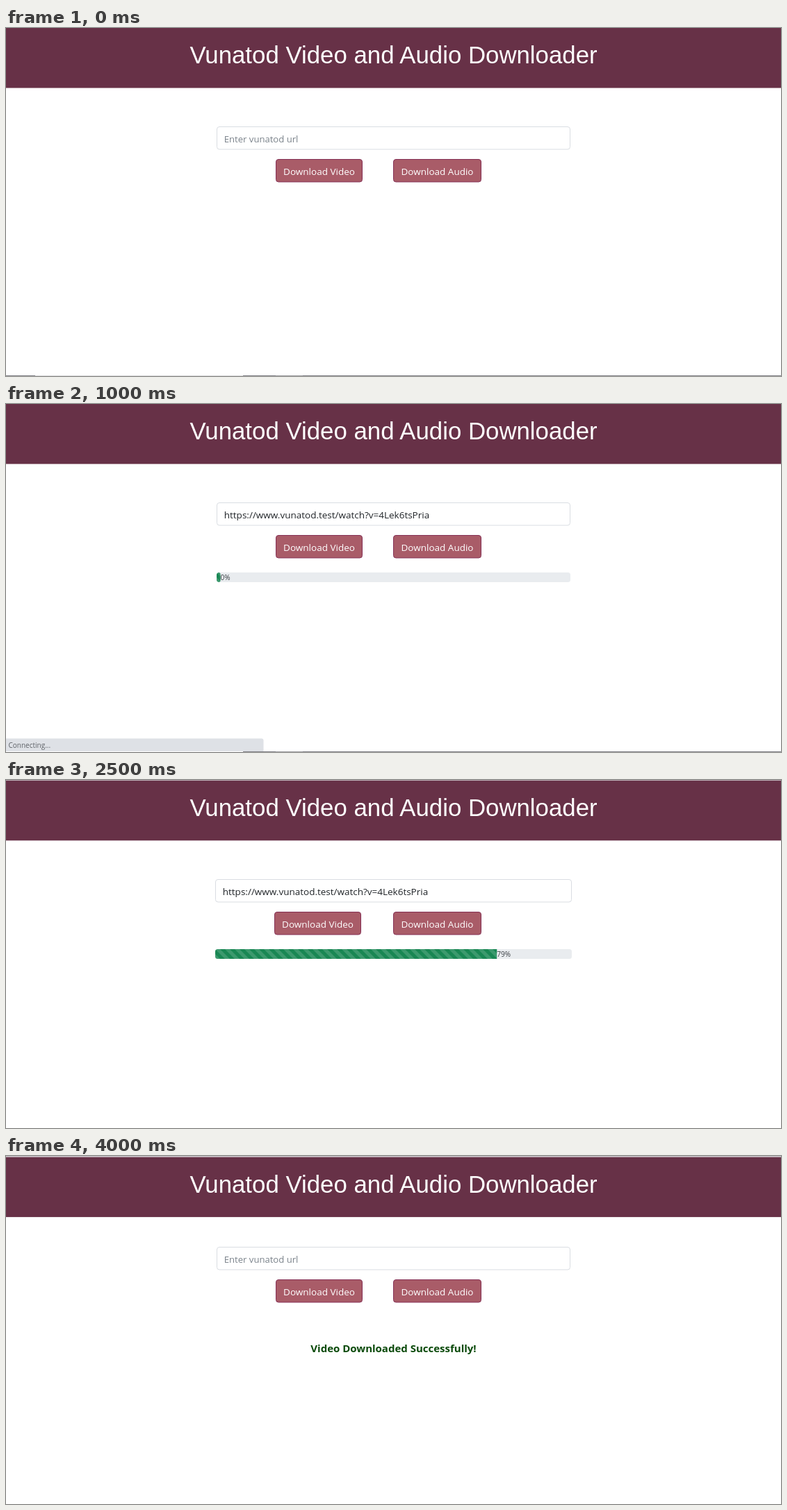
Animation of 1115 by 502 pixels, one loop 4.5 s. Source, as an HTML page:

```html
<!DOCTYPE html>
<html lang="en">
<head>
<meta charset="utf-8">
<title>Downloader</title>
<style>
  html, body { margin: 0; width: 100%; height: 100%; overflow: hidden; background: #fff; }
  svg { display: block; width: 100vw; height: 100vh; }
  text { font-family: "Open Sans", "Noto Sans", sans-serif; font-size: 13.5px; fill: #212529; white-space: pre; }
  .title { font-family: "Liberation Sans", Arial, sans-serif; font-size: 34.8px; fill: #fff; text-anchor: middle; }
  .hint { font-size: 13.1px; fill: #7b838b; }
  .label { fill: #fff; text-anchor: middle; }
  .small { font-size: 10.1px; fill: #3c4146; }
  .status { font-size: 10px; fill: #5f6368; }
  .success { font-size: 15px; font-weight: 700; fill: #0b4a0b; text-anchor: middle; }
</style>
</head>
<body>
<svg id="stage" viewBox="0 0 1115 502"></svg>
<script>
const LOOP = 4500;
const URL_TEXT = "https://www.vunatod.test/watch?v=4Lek6tsPria";

// top: height of the strip above the header; wide: layout without a scrollbar
const start = { at: 0, top: 0, formY: 142, taskbar: 0 };
const loading = { top: .8, formY: 143, wide: true, url: true };
const states = [
  start,
  { ...start, at: 500, url: true },
  { ...start, at: 1000, url: true, progress: 0, taskbar: 341, statusY: 482.5 },
  { ...loading, at: 1500, progress: 14 },
  { ...loading, at: 2000, progress: 50 },
  { ...loading, at: 2500, progress: 79 },
  { ...loading, at: 3500, top: .6, progress: 86, statusY: 483.5 },
  { at: 4000, top: 1.6, formY: 131, done: true },
];

const rect = (x, y, w, h, fill, extra = "") =>
  `<rect x="${x}" y="${y}" width="${w}" height="${h}" fill="${fill}" ${extra}/>`;
const text = (x, y, cls, content) => `<text x="${x}" y="${y}" class="${cls}">${content}</text>`;
const outlined = (x, y, w, h, fill, stroke) =>
  rect(x + .5, y + .5, w - 1, h - 1, fill, `rx="3.5" stroke="${stroke}"`);
const button = (x, y, w, label) =>
  outlined(x, y, w, 33.5, "#a95c68", "#853055") + text(x + w / 2, y + 22.7, "label", label);
const formX = wide => wide ? 301 : 303;

function header({ top }) {
  return rect(0, 0, 1115, top, "#c8c5c9") + rect(0, top, 1115, 86.5, "#673147") +
    text(557.5, 51.2 + top, "title", "Vunatod Video and Audio Downloader");
}

function form({ formY, wide, url }) {
  const x = formX(wide);
  return outlined(x, formY, 1115 - 2 * x, 33.5, "#fff", "#d9dde2") +
    text(x + 10.8, formY + 22.7, url ? "" : "hint", url ? URL_TEXT : "Enter vunatod url") +
    button(wide ? 386 : 388, formY + 47, 125, "Download Video") +
    button(557, formY + 47, 127, "Download Audio");
}

function progressBar({ formY, wide, progress }) {
  const x = formX(wide), y = formY + 101, width = 1115 - 2 * x;
  const filled = Math.max(5.5, width * progress / 100);
  return `<defs>
      <pattern id="stripes" width="14" height="14" patternUnits="userSpaceOnUse" patternTransform="translate(${x} ${y})">
        <rect width="14" height="14" fill="#198754"/>
        <path d="M0 7 7 14H0ZM0 0H7L14 7V14Z" fill="#3c996e"/>
      </pattern>
      <clipPath id="track">${rect(x, y, width, 14, "#000", 'rx="3.5"')}</clipPath>
    </defs>` +
    rect(x, y, width, 14, "#e9ecef", 'rx="3.5"') +
    rect(x, y, filled, 14, "url(#stripes)", `clip-path="url(#track)" ${progress ? "" : 'rx="2.5"'}`) +
    text(x + filled, y + 11.3, "small", progress + "%");
}

function taskbar(from) {
  return rect(from, 501, 1115 - from, 1, "#85858a") +
    (from ? "" : rect(42, 501, 299, 1, "#dededf")) +
    rect(388, 501, 39, 1, "#a2a2a6");
}

function statusBubble(y) {
  return `<path d="M0 ${y}H367.5q3 0 3 3V${y < 483 ? 501 : 502}H0Z" fill="#dee1e6"/>` +
    text(3.5, y + 13.6, "status", "Connecting...");
}

function draw(state) {
  return rect(0, 0, 1115, 502, "#fff") + header(state) + form(state) +
    (state.progress === undefined ? "" : progressBar(state)) +
    (state.done ? text(557.5, 283, "success", "Video Downloaded Successfully!") : "") +
    (state.taskbar === undefined ? "" : taskbar(state.taskbar)) +
    (state.statusY ? statusBubble(state.statusY) : "");
}

const stage = document.getElementById("stage");
const began = performance.now();
let shown;
function tick() {
  const time = (performance.now() - began) % LOOP;
  const state = states.findLast(s => s.at <= time);
  if (state !== shown) stage.innerHTML = draw(shown = state);
  requestAnimationFrame(tick);
}
tick();
</script>
</body>
</html>
```
